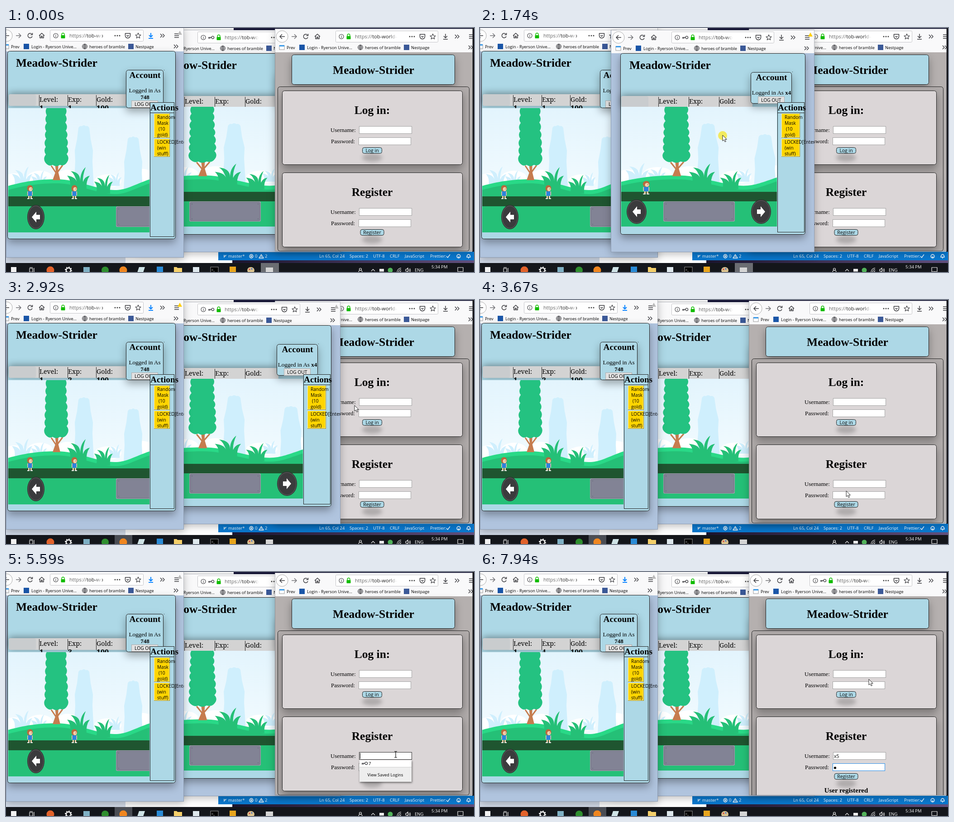
These frames come from a looping animation (1034x542 px, 8000 ms). An HTML page:

```html
<!DOCTYPE html>
<html lang="en">
<head>
<meta charset="utf-8">
<title>Three browser windows</title>
<style>
html,body{margin:0;width:100%;height:100%;overflow:hidden;background:#fff}
#stage{display:block;width:1034px;height:542px}
text{font-family:"Open Sans",sans-serif;white-space:pre}
.s{font-family:"Liberation Serif",serif}
.c{font-family:"Noto Serif",serif}
.b{font-weight:bold}
.m{text-anchor:middle}
.sh{filter:drop-shadow(0 8px 9px #0005)}
.win{filter:drop-shadow(0 4px 9px #0004)}
.blur{filter:blur(4px)}
.i{fill:none;stroke:#3c3c40;stroke-width:1.5;stroke-linejoin:round}
</style>
</head>
<body>
<svg id="stage" viewBox="0 0 1034 542"></svg>
<script>
const BLUE = '#add8e6', INK = '#222', GREEN = '#25c077', MIST = '#cfeffd';
const GAME = 'Meadow-Strider', USER = '748';
const $ = id => document.getElementById(id);

const T = (x, y, size, s, cls = '', fill = '#000', more = '') =>
  `<text x="${x}" y="${y}" font-size="${size}" class="${cls}" fill="${fill}" ${more}>${s}</text>`;
const R = (x, y, w, h, fill, more = '') =>
  `<rect x="${x}" y="${y}" width="${w}" height="${h}" fill="${fill}" ${more}/>`;
const P = (d, fill, more = '') => `<path d="${d}" fill="${fill}" ${more}/>`;
const C = (x, y, r, fill, more = '') => `<circle cx="${x}" cy="${y}" r="${r}" fill="${fill}" ${more}/>`;
const E = (x, y, rx, ry, fill, more = '') =>
  `<ellipse cx="${x}" cy="${y}" rx="${rx}" ry="${ry}" fill="${fill}" ${more}/>`;
const icon = (x, y, d, more = '') => `<path class="i" d="${d}" transform="translate(${x} ${y})" ${more}/>`;
const box = (x, y, w, h, fill, r = 5, more = '') =>
  R(x + .5, y + .5, w - 1, h - 1, fill, `rx="${r}" stroke="${INK}" ${more}`);
const card = (x, y, w, h, fill, more = '') => box(x, y, w, h, fill, 5, 'class="sh" ' + more);

// ---- browser chrome ----
const keyIcon = (x, y) => icon(x, y, 'M-6 0H1M-5 0V3M-2.5 0V3M1 0a2.8 2.8 0 1 0 5.6 0a2.8 2.8 0 1 0-5.6 0', 'style="stroke-width:1.3"');

function address(u, e, y, key) {
  const lock = u + (key ? 47 : 29), tx = u + (key ? 60 : 43);
  const host = key || e - u < 210 ? 'tob-wo' : 'tob-world-';
  return (key ? keyIcon(u + 30, y) : '') +
    R(lock - 4.5, y - 1, 9, 7, '#12bc00', 'rx="1"') +
    icon(lock, y, 'M-2.8 0V-3a2.8 2.8 0 0 1 5.6 0V0', 'style="stroke:#12bc00"') +
    T(tx, y + 4, 11.2, `<tspan fill="#666">https://</tspan>${host}`, '', '#222') +
    R(e - 106, y - 9, 15, 18, 'url(#fade)');
}

function chrome(x, y, u, e, id, urls) {
  const n = y + 17, b = y + 41, bar = e + 74;
  return R(x, y, 460, 52, '#f9f9fa') +
    C(x + 16, n, 13, '#fff', 'stroke="#aaa"') +
    icon(x + 16, n, 'M6 0H-5M0-5L-5 0L0 5') +
    icon(x + 43, n, 'M-6 0H5M0-5L5 0L0 5', 'opacity=".7"') +
    icon(x + 68, n, 'M4-3.5A5 5 0 1 0 5 1.5M5.5-6V-2H1.5') +
    icon(x + 94, n, 'M-6 0L0-5.5L6 0M-4-1V5H-1V1H1V5H4V-1') +
    R(u + .5, y + 4.5, e - u, 25, '#fff', 'rx="2" stroke="#c4c4c8"') +
    icon(u + 13, n, 'M-5 0a5 5 0 1 0 10 0a5 5 0 1 0-10 0M0-1V3M0-3V-2', 'style="stroke-width:1.1"') +
    urls +
    [-5, 0, 5].map(d => C(e - 57 + d, n, 1.5, '#444')).join('') +
    icon(e - 34, n, 'M-5.5-5H5.5V0a5.5 5.5 0 0 1-11 0ZM-2.5-1L0 1.5L2.5-1') +
    icon(e - 11, n, 'M0-6L1.8-2L6-1.6L2.8 1.2L3.7 5.5L0 3.2L-3.7 5.5L-2.8 1.2L-6-1.6L-1.8-2Z', 'style="stroke-width:1.2"') +
    icon(e + 17, n, 'M0-6V3M-4-1L0 3L4-1M-5 6H5', id == 'L' ? 'style="stroke:#0a84ff;stroke-width:2"' : '') +
    icon(e + 43, n, 'M-5-4L-1 0L-5 4M0-4L4 0L0 4') +
    icon(bar, n, 'M-5-4H5M-5 0H5M-5 4H5') +
    (id == 'R' ? '' : P(`M${bar + 7} ${n - 11}l5 9h-10z`, '#bbb', `id="warn${id}"`)) +
    R(x + 10, b - 4, 11, 9, '#fff', 'stroke="#999"') + R(x + 10, b - 5, 11, 3, '#3c9be8') +
    T(x + 26, b + 4, 9.2, 'Prev') +
    R(x + 54, b - 6, 12, 12, '#1a56a8') +
    T(x + 71, b + 4, 9.2, 'Login - Ryerson Unive...') +
    icon(x + 189, b, 'M-5.5 0a5.5 5.5 0 1 0 11 0a5.5 5.5 0 1 0-11 0H5.5M0-5.5V5.5M-4.5-3H4.5M-4.5 3H4.5M0-5.5Q-5 0 0 5.5Q5 0 0-5.5', 'style="stroke-width:.9"') +
    T(x + 199, b + 4, 9.2, 'heroes of bramble') +
    R(x + 285, b - 6, 12, 12, '#3b5998') +
    T(x + 301, b + 4, 9.2, 'Nestpage') +
    icon(bar - 1, b, 'M-5-4L-1 0L-5 4M0-4L4 0L0 4');
}

const frame = (id, x, y, w, h, body) => `<g id="win${id}">` +
  R(x, y, w, h, '#888', 'class="win"') +
  `<svg x="${x}" y="${y}" width="${w}" height="${h}" viewBox="${x} ${y} ${w} ${h}">${body}</svg>` +
  R(x + .5, y - .5, w - 1, h, 'none', 'stroke="#5a6270" stroke-opacity=".4"') + '</g>';

// ---- game scene ----
const pillar = (x, y) => P(`M${x - 12} ${y}q3-6 8-4q4-4 8 0q5-2 8 4l3 25 5 25-1 25 4 75h-46l4-75-1-25 5-25z`, MIST);
const plant = (x, y, k, fill) =>
  P('M-16 8Q-10-12-21-24-2-22 1-8-4-28-13-34 8-32 8-12 8-32 20-43 13-24 14-10 18-22 29-24 20-12 22 8Z', fill, `transform="translate(${x} ${y}) scale(${k})"`);
const player = x => `<g transform="translate(${x} 349)">` +
  R(-4, 22, 3, 8, '#f3c7a2') + R(1, 22, 3, 8, '#f3c7a2') +
  R(-6, 29, 5, 2, '#eee') + R(1, 29, 5, 2, '#eee') +
  R(-6, 14, 2, 9, '#f3c7a2') + R(4, 14, 2, 9, '#f3c7a2') +
  R(-4.5, 13, 9, 11, '#2b83dc', 'rx="1.5"') +
  E(0, 7, 6.5, 7, '#b9693c') + E(1.5, 9, 4, 4.5, '#f6d0ac') + C(3, 8.5, .7, '#333') + '</g>';
const hill = 'M0 352C40 341 65 337 105 336S165 346 215 357S275 347 340 329V460H0Z';
const scene = R(0, 170, 340, 290, 'url(#sky)') +
  [[20, 338, 30], [75, 332, 28], [135, 330, 24], [225, 340, 30], [300, 328, 26]].map(c => E(c[0], c[1], c[2], 15, '#fff')).join('') +
  pillar(172, 222) + pillar(281, 247) +
  [[32, .9], [70, .7], [238, .6]].map(c => plant(c[0], 346, c[1], MIST)).join('') +
  P(hill, '#29d987') + P(hill, GREEN, 'transform="translate(0 9)"') +
  plant(156, 352, 1, GREEN) + plant(212, 361, .82, GREEN) +
  P('M108 298L110 318L103 338H120L115 318L116 298Z', '#c67c4e') +
  P('M110 321L100 306M114 320L125 305', 'none', 'stroke="#c67c4e" stroke-width="3"') +
  P('M91 176q-6 8-1 18q-6 8 0 17q-7 9-1 18q-6 8 0 17q-7 9-1 18q-6 8 0 17q-7 9-1 18q8 10 16 5q8 6 16 0q10 4 16-6' +
    'q6-9-1-18q7-8 0-17q6-9-1-18q6-8-1-17q6-9-1-18q6-8 0-17q6-9-1-18z', '#24c281') +
  R(0, 374, 340, 22, '#1f5530') + R(0, 396, 340, 60, GREEN) + player(53);

const arrowBtn = (x, y, rx, dir) => E(x, y, rx, 27, '#2c2c2e') + E(x, y, rx - 2, 25, '#3b3b3d', 'stroke="#555" stroke-width="1.5"') +
  P('M-9 0L1-12V-5H9V5H1V12Z', '#fff', `transform="translate(${x} ${y}) scale(${dir} 1)"`);
const slab = (x, y, w, h) => R(x, y, w, h, '#9c9caa', 'rx="3"') + R(x + 2, y + 2, w - 4, h - 4, '#828395', 'rx="2" stroke="#6d6e80"') +
  [[6, 6], [w - 6, 6], [6, h - 6], [w - 6, h - 6]].map(p => C(x + p[0], y + p[1], 1, '#6a6b7c')).join('');

const stat = (x, y, s) => R(x - 1, y - 15, 1, 24, INK) + T(x, y, 14.3, s, 'c');
const stats = (x, y, w, cols) => R(x, y, w, 26, '#d3d3d3', 'rx="4" style="filter:drop-shadow(0 -2px 8px #0006)"') +
  R(x, y, 60, 26, '#c4c9cc', 'rx="4" opacity=".6"') +
  ['Level:', 'Exp:', 'Gold:'].map((s, i) => stat(cols[i], y + 17, s)).join('');

const actions = (x, y, w, h) => R(x + .5, y + .5, w, h, BLUE, `stroke="${INK}"`) + R(x, y + 23, w, 1, INK) +
  T(x + 1, y + 18, 19.3, 'Actions', 's b') +
  [[190, 54], [246, 40]].map(([by, bh]) => R(x + 9, by, w - 18, bh, '#b08f00') + R(x + 9, by, w - 19, bh - 1, '#fff0a0') +
    R(x + 10, by + 1, w - 21, bh - 3, '#ffd500')).join('') +
  [['Random', 0, 202], ['Mask', 0, 215], ['(10', 3, 228], ['gold)', 0, 241], ['LOCKED[Enter', 0, 257], ['(win', 0, 270], ['stuff)', 0, 283]]
    .map(([s, d, by]) => T(x + 16 + d, by, 10.1, s)).join('');

const logout = (x, y) => R(x + .5, y + .5, 58, 15, '#e1e1e1', 'stroke="#adadad"') + T(x + 7, y + 12, 10.3, 'LOG OUT');

const left = frame('L', 0, -2, 393, 512,
  R(0, 0, 393, 512, '#b0c4de') + chrome(-15, 0, 97, 303, 'L', address(97, 303, 17)) +
  card(3, 51, 372, 418, BLUE) + T(22, 86, 25.5, GAME, 's b') +
  stats(6, 147, 262, [74, 137, 200]) +
  T(74, 184, 16, '1', 'c b') + T(137, 184, 16, '1', 'c b', '#000', 'id="exp"') + T(200, 184, 16, '100', 'c b') +
  `<svg x="5" y="178" width="312" height="276" viewBox="5 178 312 276">${scene}${player(151)}${slab(243, 396, 160, 46)}</svg>` +
  arrowBtn(66, 420, 19, 1) +
  card(265, 93, 83, 85, BLUE) + R(349, 93, 1, 1, INK) +
  T(307, 111, 19.4, 'Account', 's b m') + T(306.5, 143, 13, 'Logged in As', 's m') + T(307, 158, 13, USER, 's b m') +
  logout(277, 161) + actions(318, 165, 53, 298));

const mid = frame('M', 289, 5, 450, 493,
  R(289, 0, 450, 500, '#b0c4de') + chrome(290, 4, 423, 649, 'M', address(423, 649, 21, true)) +
  card(310, 56, 409, 403, BLUE) + T(330, 91, 25.5, GAME, 's b') +
  stats(312, 151, 290, [395, 462, 529]) +
  `<svg x="312" y="175" width="344" height="266" viewBox="5 178 299 276" preserveAspectRatio="none">${scene}</svg>` +
  arrowBtn(346, 408, 22, 1) + arrowBtn(621, 408, 22, -1) + slab(405, 385, 158, 45) +
  card(598, 98, 91, 70, BLUE) + R(690, 97, 1, 1, INK) +
  T(644, 116, 19.4, 'Account', 's b m') +
  T(644, 148, 13, 'Logged in As <tspan font-weight="bold">x4</tspan>', 's m') +
  logout(614, 152) + actions(657, 165, 59, 288));

// ---- login and register page ----
const form = (y, title, btn, w, id) => T(809, y + 51, 25.5, title, 's b m') +
  T(717, y + 91, 12.9, 'Username:', 's') + T(718, y + 116, 12.9, 'Password:', 's') +
  R(780.5, y + 78.5, 116, 16, '#fff', `stroke="#a5a5a5" id="user${id}"`) +
  R(779.5, y + 103.5, 115, 16, '#fff', `stroke="#a5a5a5" id="pass${id}"`) +
  E(809, y + 148, 22, 9, '#0003', 'class="blur"') +
  box(809 - w / 2, y + 125, w, 14, BLUE, 4) + T(809, y + 136, 10.4, btn, 'm');
const drop = (id, x, y) => `<g id="${id}">` + R(x, y, 115, 48, '#eee', 'style="filter:drop-shadow(1px 2px 2px #0008)"') +
  R(x, y, 115, 15, '#fff') + R(x, y + 15, 115, 1, '#d0d0d0') + keyIcon(x + 11, y + 7) +
  T(x + 20, y + 11, 9.6, '7') + T(x + 57, y + 36, 9.3, 'View Saved Logins', 'm') + '</g>';

const right = frame('R', 594, 2, 437, 494,
  R(594, 0, 440, 500, '#b5b0af') +
  chrome(594, 2, 728, 954, 'R', `<g id="url0">${address(728, 954, 19)}</g><g id="url1">${address(728, 954, 19, true)}</g>`) +
  card(631, 59, 361, 67, BLUE) + T(812, 102, 25.5, GAME, 's b m') +
  box(600, 130, 424, 366, '#b0abaa', 5, 'id="outer"') +
  card(610, 139, 399, 165, '#dbd6d7') + card(610, 321, 399, 166, '#dbd6d7', 'id="panel"') +
  form(140, 'Log in:', 'Log in', 44, 0) + form(322, 'Register', 'Register', 53, 1) +
  T(782, 413, 10.3, '', '', '#000', 'id="name"') + C(784.5, 435, 2.6, '#000', 'id="dot"') +
  T(809, 490, 14.9, 'User registered', 's b m', '#000', 'id="msg"') +
  drop('drop0', 781, 418) + drop('drop1', 779.5, 443) + R(0, 0, 1, 13, '#000', 'id="caret"'));

// ---- desktop ----
const status = [[491, 'master*'], [550, '0'], [572, '2'], [692, 'Ln 65, Col 24'], [759, 'Spaces: 2'], [811, 'UTF-8'],
  [848, 'CRLF'], [881, 'JavaScript'], [937, 'Prettier:']];
const desktop = R(0, 0, 1034, 542, '#fff') + R(503, 0, 531, 8, '#1b1a3c') + R(1030, 0, 4, 500, '#17171d') +
  R(0, 500, 264, 24, '#d3dcea') + R(500, 514, 534, 10, 'url(#night)') +
  R(469, 497, 565, 19, '#0a79cf') + status.map(([x, s]) => T(x, 510, 9.5, s, '', '#fff')).join('') +
  ['M-2-3V3M-2 0Q2 0 2-3|484', 'M-4 0a4 4 0 1 0 8 0a4 4 0 1 0-8 0M-2-2L2 2M2-2L-2 2|542', 'M0-4L5 4H-5ZM0-1V2|564', 'M-4 0L-1 3L4-4|977',
    'M-4 0a4 4 0 1 0 8 0a4 4 0 1 0-8 0M-2 1Q0 3 2 1M-1.5-1.5V-1M1.5-1.5V-1|1000', 'M-4 2L-3-2Q0-6 3-2L4 2ZM-1 4H1|1022']
    .map(s => { const [d, x] = s.split('|'); return icon(x, 507, d, 'style="stroke:#fff;stroke-width:1.3"'); }).join('');

const white = 'style="stroke:#eee;stroke-width:1.2"';
const taskbar = R(0, 522, 1034, 20, '#14161b') + R(240, 522, 39, 20, '#4a4d54', 'id="hot0"') + R(563, 522, 40, 20, '#6b6d72', 'id="hot1"') +
  R(11, 531, 12, 12, '#f2f2f2') + icon(56, 538, 'M-4-4H3V4H-4ZM-4-6H3M6-5V5', white) +
  C(98, 538, 8.5, '#e2622b') +
  C(138, 538, 5, 'none', 'stroke="#eee" stroke-width="2.5"') + C(138, 538, 7, 'none', 'stroke="#eee" stroke-width="2" stroke-dasharray="2.7 2.8"') +
  R(171, 531, 14, 12, '#7fb0c4') + C(219, 538, 8, '#2f8f2f') + C(259, 538, 8.5, '#f0861f') +
  P('M294 531h13l-4 12h-13z', '#cfe3e6') + R(333, 530, 14, 13, '#2a8bd6') +
  P('M371 531h6l2 2h10v10h-18z', '#f4cf6a') + R(413, 531, 14, 12, '#dde7ec') +
  R(452, 531, 17, 12, '#000', 'stroke="#999"') + T(454, 540, 7, '&gt;_', '', '#fff') +
  R(494, 530, 14, 13, '#e8a51c') + E(541, 538, 8, 7, '#d8c18e') + C(538, 536, 1.6, '#d33') + C(543, 535, 1.6, '#36c') +
  R(574, 532, 16, 11, '#d5d5d5') +
  icon(783, 538, 'M-4 5Q-4 0 0 0T4 5M-2.5-2a2.5 2.5 0 1 0 5 0a2.5 2.5 0 1 0-5 0', white) + icon(811, 538, 'M-4 2L0-2L4 2', white) +
  R(825, 535, 10, 6, '#eee') + C(849, 538, 5.5, '#52b35a') +
  icon(869, 538, 'M-5 4Q-4-4 4-5M-2 4Q-1-1 4-2M1 4L4 1', white) + icon(888, 538, 'M-5-2H-3L0-5V5L-3 2H-5ZM2-2Q4 0 2 2M4-4Q7 0 4 4', white) +
  T(903, 541, 9.5, 'ENG', '', '#fff') + T(940, 534, 9.5, '5:34 PM', '', '#fff') + icon(1004, 537, 'M-6-5H6V4H2L0 6V4H-6Z', white);

const pointer = `<g id="cursor">${C(0, 1, 10, '#f6e52a', 'opacity=".75" id="press"')}` +
  P('M0 0V13L3 10.3L5.2 15L7.4 14L5.2 9.4H9.2Z', '#fff', 'stroke="#111" stroke-width=".9" id="arrow"') +
  P('M-3-6.5H3M-3 7H3M0-6.5V7', 'none', 'stroke="#111" stroke-width="1.2" id="beam"') + '</g>';

const gradient = (id, dir, a, b) => `<linearGradient id="${id}" ${dir}><stop stop-color="${a}"/><stop offset="1" stop-color="${b}"/></linearGradient>`;
$('stage').innerHTML = '<defs>' + gradient('sky', 'x2="0" y2="1"', '#e2f4fd', '#fafeff') + gradient('fade', '', '#fff0', '#fff') +
  gradient('night', '', '#1c1630', '#62517f') + `</defs>${desktop}<g id="wins">${mid}${left}${right}</g>${taskbar}${pointer}`;

// ---- motion ----
const path = [[70, 903, 463], [140, 790, 390], [220, 600, 290], [290, 480, 237], [430, 480, 237], [620, 476, 212], [850, 588, 252],
  [1180, 545, 225], [1260, 545, 225], [1660, 536, 238], [2150, 536, 238], [2400, 250, 250], [2530, 250, 250], [2840, 745, 236],
  [2920, 770, 234], [2990, 770, 234], [3260, 790, 225], [3420, 790, 225], [3670, 809, 424], [4000, 861, 405], [7310, 861, 405], [7790, 859, 238]];
const presses = [1660, 2450, 3070, 4330];

function place(t) {
  const i = path.findIndex(p => p[0] > t);
  if (i < 1) return (i ? path[path.length - 1] : path[0]).slice(1);
  const [a, b] = [path[i - 1], path[i]], k = (t - a[0]) / (b[0] - a[0]);
  return [1, 2].map(n => a[n] + (b[n] - a[n]) * k);
}
const show = (id, on) => $(id).setAttribute('visibility', on ? 'visible' : 'hidden');
const set = (id, key, v) => $(id).setAttribute(key, v);
let stack = '';

function draw() {
  const t = performance.now() % 8000;
  const order = t < 1660 ? 'MLR' : t < 2450 ? 'LRM' : t < 3070 ? 'RML' : 'MLR';
  if (order != stack) {
    $('wins').append(...[...order].map(c => $('win' + c)));
    for (const c of 'LM') set('warn' + c, 'fill', order[2] == c ? '#ffcf0d' : '#bbb');
    stack = order;
  }
  show('hot0', t >= 1820);
  show('hot1', t < 1820);
  $('exp').textContent = 1 + (t >= 2500) + (t >= 4950) + (t >= 7400);

  const inPass = t >= 6150, typed = t >= 6650, done = t >= 7390;
  $('name').textContent = t < 5660 ? '' : t < 6000 ? 'x' : 'x5';
  show('dot', typed);
  show('drop0', t >= 4500 && t < 5660);
  show('drop1', t >= 6230 && t < 6650);
  set('user1', 'stroke', t >= 3930 && !done ? '#333' : '#a5a5a5');
  set('pass1', 'stroke', inPass ? '#2a8fe8' : '#a5a5a5');
  show('caret', t >= 4500 && (t - (inPass ? 6280 : 4500)) % 1060 < 530);
  set('caret', 'x', inPass ? (typed ? 787 : 781) : t < 5660 ? 782 : t < 6000 ? 787 : 793);
  set('caret', 'y', inPass ? 427.5 : 402);
  show('url0', t < 6990);
  show('url1', t >= 6990);
  show('msg', done);
  set('panel', 'height', done ? 190 : 165);
  set('outer', 'height', done ? 400 : 365);

  const beam = t >= 3930 && !done;
  set('cursor', 'transform', `translate(${place(t)})`);
  set('cursor', 'display', t < 70 ? 'none' : 'inline');
  show('beam', beam);
  show('arrow', !beam);
  show('press', presses.some(p => t >= p && t < p + 140));
  requestAnimationFrame(draw);
}
draw();
</script>
</body>
</html>
```
